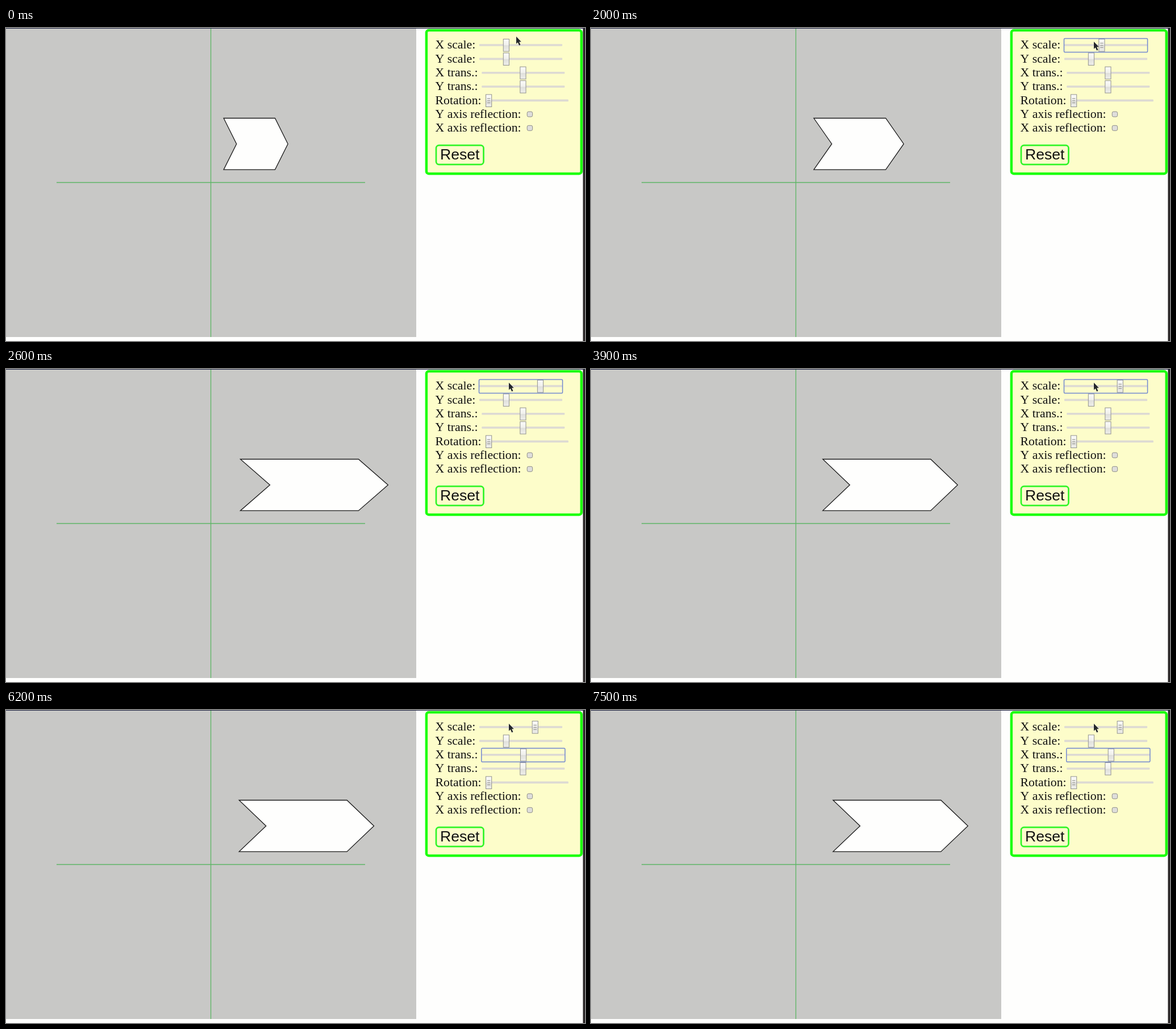
Animation, 1019 px wide and 550 px high, one loop 8 s. Source, as an HTML page:

```html
<!DOCTYPE html>
<html lang="en">
<head>
<meta charset="utf-8">
<title>Shape transformations</title>
<style>
  html, body { margin: 0; width: 100%; height: 100%; overflow: hidden; background: #fefefd; }
  svg { display: block; }
  #labels { font: 21.75px "Liberation Serif", serif; font-kerning: none; }
</style>
</head>
<body>
<svg id="stage" width="1019" height="550" viewBox="0 0 1019 550">
  <defs>
    <linearGradient id="knob" x2="0" y2="1">
      <stop stop-color="#fbfbf9"/><stop offset=".48" stop-color="#f0f0ec"/>
      <stop offset=".52" stop-color="#e0e0dc"/><stop offset="1" stop-color="#eeeeea"/>
    </linearGradient>
  </defs>
  <rect width="722" height="543" fill="#c8c8c6"/>
  <path d="M89 271.5H632M360.5 0V543" stroke="#5cb564" stroke-width="1.3"/>
  <polygon id="shape" fill="#fefefd" stroke="#1a1a1a" stroke-width="1.3"/>
  <rect x="739.9" y="4.1" width="272.8" height="251.8" rx="4" fill="#fdfdca" stroke="#1cff0c" stroke-width="4.5"/>
  <g id="labels" fill="#111"></g>
  <g id="sliders"></g>
  <g fill="#dfdedb" stroke="#8c8c88">
    <rect x="917.2" y="147" width="9.4" height="9" rx="2.5"/>
    <rect x="917.2" y="171.3" width="9.4" height="9" rx="2.5"/>
  </g>
  <rect id="focus" width="147" height="24" rx="1.5" fill="none" stroke="#7288cf" stroke-width="1.5"/>
  <rect x="757" y="206.2" width="83.5" height="33.6" rx="5" fill="#fdfdca" stroke="#30f528" stroke-width="2.7"/>
  <text x="764" y="230.6" font-size="26.6" font-family="Liberation Sans, sans-serif" fill="#111">Reset</text>
  <path id="cursor" d="M0 0V12.8L2.8 10.2L5.1 15.6L7.4 14.6L5.1 9.3H8.8Z" fill="#23262b" stroke="#eee" stroke-opacity=".5" stroke-width=".8" paint-order="stroke"/>
  <rect x="1015.4" width="4" height="550" fill="#2b2728"/>
  <rect width="1019" height="1" fill="#1c2140"/>
</svg>
<script>
const LOOP = 8000, STEP = 100, REPEAT = 37;
const UNIT = 22.6, ORIGIN = [360.5, 271.5], ROW = 24.35;
const ARROW = [[1, 1], [5, 1], [6, 3], [5, 5], [1, 5], [2, 3]];
const LABELS = ["X scale:", "Y scale:", "X trans.:", "Y trans.:", "Rotation:", "Y axis reflection:", "X axis reflection:"];
const TRACKS = [833, 833, 837.3, 837.3, 843.8];

const byId = id => document.getElementById(id);
const clamp = (v, lo, hi) => Math.min(hi, Math.max(lo, v));
const rowY = i => 30.2 + i * ROW;
const move = (el, x, y) => el.setAttribute("transform", `translate(${x} ${y})`);

// Key strokes so far: single taps, and auto-repeats while a key is held.
const taps = (t, ...times) => times.filter(time => time <= t).length;
const held = (t, from, to) => Math.floor((clamp(t, from, to) - from) / REPEAT);
const progress = (t, from, to) => clamp((t - from) / (to - from), 0, 1);

byId("labels").innerHTML = LABELS.map((s, i) =>
  `<text x="755.6" y="${36.3 + i * ROW}">${s}</text>`).join("");
byId("sliders").innerHTML = TRACKS.map((x, i) =>
  `<rect x="${x}" y="${rowY(i) - 2}" width="146" height="3.6" rx="1" fill="#dddad3"/>
   <g class="thumb"><rect x="-5.1" y="-10.7" width="10.2" height="21.6" fill="url(#knob)" stroke="#92928e"/>
   <path d="M-2.7 -3.5H2.7M-2.7 .2H2.7M-2.7 3.9H2.7" stroke="#888884"/></g>`).join("");
const thumbs = document.querySelectorAll(".thumb");

function placeThumb(i, offset, grip) {
  move(thumbs[i], TRACKS[i] + 5.8 + offset, rowY(i));
  thumbs[i].lastElementChild.style.display = grip ? "" : "none";
}
const scaleOffset = scale => (scale - 0.1) * 46.207;
const shiftOffset = shift => 66.8 + shift * 6.7;

placeThumb(1, scaleOffset(1), false);
placeThumb(3, shiftOffset(0), false);
placeThumb(4, 0, true);

function draw(t) {
  const scale = 1 + 0.1 * (taps(t, 1500) + held(t, 1885, 2400) - taps(t, 2600, 2800, 3100));
  const shift = 0.05 * (taps(t, 6000, 6200, 6400) + held(t, 6770, 7300) - taps(t, 7500));
  const focus = taps(t, 1500, 4100, 5200) - 1;

  byId("shape").setAttribute("points", ARROW.map(([x, y]) =>
    [ORIGIN[0] + UNIT * (x * scale + shift), ORIGIN[1] - UNIT * y]).join(" "));

  const offset = scaleOffset(scale);
  placeThumb(0, offset, offset % 1 < 0.45);
  placeThumb(2, shiftOffset(shift), false);
  const hovered = t >= 500 && t < 2000;
  thumbs[0].firstElementChild.setAttribute("fill", hovered ? "#fcfcfa" : "url(#knob)");

  byId("focus").style.display = focus < 0 ? "none" : "";
  if (focus >= 0) move(byId("focus"), TRACKS[focus] - 0.5, rowY(focus) - 11.6);

  const approach = progress(t, 0, 300), settle = progress(t, 400, 700);
  move(byId("cursor"), 898 - 10 * approach - 3 * settle, 15 + 5 * approach + 4 * settle);
}

function tick() {
  const t = performance.now() % LOOP;
  draw(t - t % STEP);
  requestAnimationFrame(tick);
}
tick();
</script>
</body>
</html>
```
